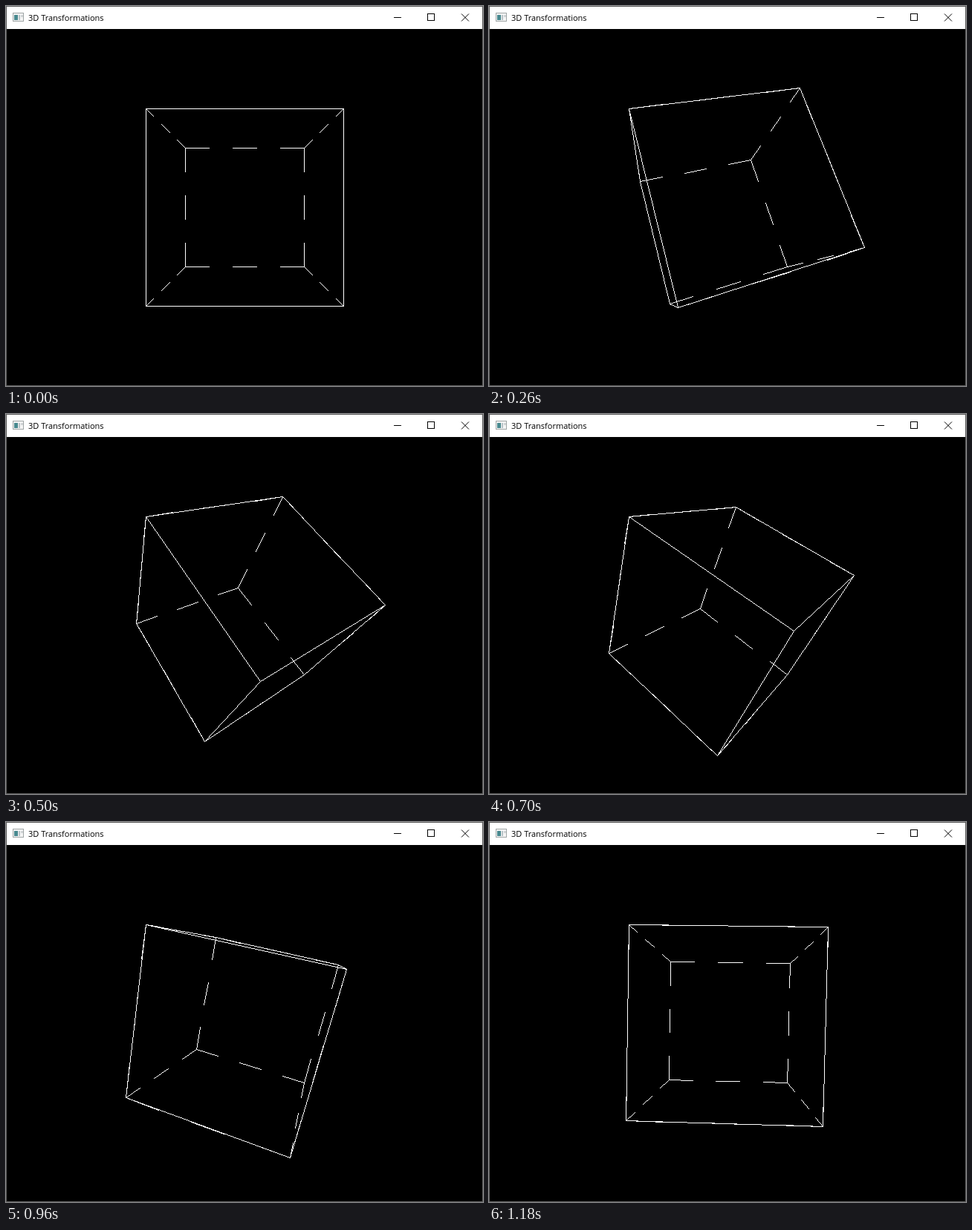
Recreate the animation shown at these times as an HTML page with a canvas. Size 642x512 px, loop 1.2 s.

```html
<!DOCTYPE html>
<html lang="en">
<head>
<meta charset="utf-8">
<title>3D Transformations</title>
<style>
  html, body { margin: 0; width: 100%; height: 100%; overflow: hidden; background: #000; }
  svg, canvas { position: absolute; display: block; }
  svg { left: 0; top: 0; }
  canvas { left: 1px; top: 31px; }
  text { font: 11px "Open Sans", "Noto Sans", sans-serif; }
</style>
</head>
<body>
<svg width="642" height="512" fill="none">
  <rect x=".5" y=".5" width="641" height="511" stroke="#5c5c5c"/>
  <rect x="1" y="1" width="640" height="30" fill="#fff"/>
  <g shape-rendering="crispEdges">
    <rect x="9.5" y="9.5" width="14" height="11" fill="#f4f4f4" stroke="#a0a6a6"/>
    <rect x="11" y="12" width="5" height="7" fill="#4a8a90"/>
    <path d="M17 12h2v7h-2z" fill="#b9c4c8"/>
    <path d="M20 12h3v3h-3z" fill="#d0d4d6"/>
    <path d="M522 15.5h10M567.5 10.5h9v9h-9z" stroke="#000"/>
  </g>
  <path d="M613 10.5l10 10M623 10.5l-10 10" stroke="#000"/>
  <text x="30" y="20" fill="#000">3D Transformations</text>
</svg>
<canvas width="640" height="480"></canvas>
<script>
const ctx = document.querySelector('canvas').getContext('2d');
const STEP_MS = 20, STEPS = 60, CAMERA = 4, FOCAL = 400;
const AXIS = [-1, -1, 1].map(v => v / Math.sqrt(3));

const cross = (a, b) => [
  a[1] * b[2] - a[2] * b[1],
  a[2] * b[0] - a[0] * b[2],
  a[0] * b[1] - a[1] * b[0]
];

// Rotation about the cube's body diagonal
function rotate(p, angle) {
  const c = Math.cos(angle), s = Math.sin(angle), q = cross(AXIS, p);
  const along = AXIS.reduce((sum, a, i) => sum + a * p[i], 0) * (1 - c);
  return p.map((v, i) => v * c + q[i] * s + AXIS[i] * along);
}

function project([x, y, z]) {
  const scale = FOCAL / (CAMERA - z);
  return [320 + x * scale, 240 + y * scale];
}

// Aliased one-pixel line
function line(a, b) {
  const [x0, y0] = a.map(Math.round), [x1, y1] = b.map(Math.round);
  const n = Math.max(Math.abs(x1 - x0), Math.abs(y1 - y0), 1);
  for (let i = 0; i <= n; i++) {
    ctx.fillRect(Math.round(x0 + (x1 - x0) * i / n), Math.round(y0 + (y1 - y0) * i / n), 1, 1);
  }
}

function dashedLine(a, b) {
  const at = t => a.map((v, i) => v + (b[i] - v) * t);
  for (let i = 0; i < 5; i += 2) line(at(i / 5), at((i + 1) / 5));
}

function drawFace(axis, side, angle) {
  const place = (n, u, v) => {
    const p = [];
    p[axis] = n;
    p[(axis + 1) % 3] = u;
    p[(axis + 2) % 3] = v;
    return rotate(p, angle);
  };
  const visible = place(side, 0, 0)[2] * CAMERA > 1;
  const corners = [[-1, -1], [1, -1], [1, 1], [-1, 1]]
    .map(([u, v]) => project(place(side, u, v)));
  const stroke = visible ? line : dashedLine;
  corners.forEach((p, i) => stroke(p, corners[(i + 1) % 4]));
}

function draw() {
  const step = Math.floor(performance.now() / STEP_MS) % STEPS;
  const angle = -step * 2 * Math.PI / 180;
  ctx.fillStyle = '#000';
  ctx.fillRect(0, 0, 640, 480);
  ctx.fillStyle = '#fff';
  for (let axis = 0; axis < 3; axis++) {
    drawFace(axis, -1, angle);
    drawFace(axis, 1, angle);
  }
  requestAnimationFrame(draw);
}
draw();
</script>
</body>
</html>
```
